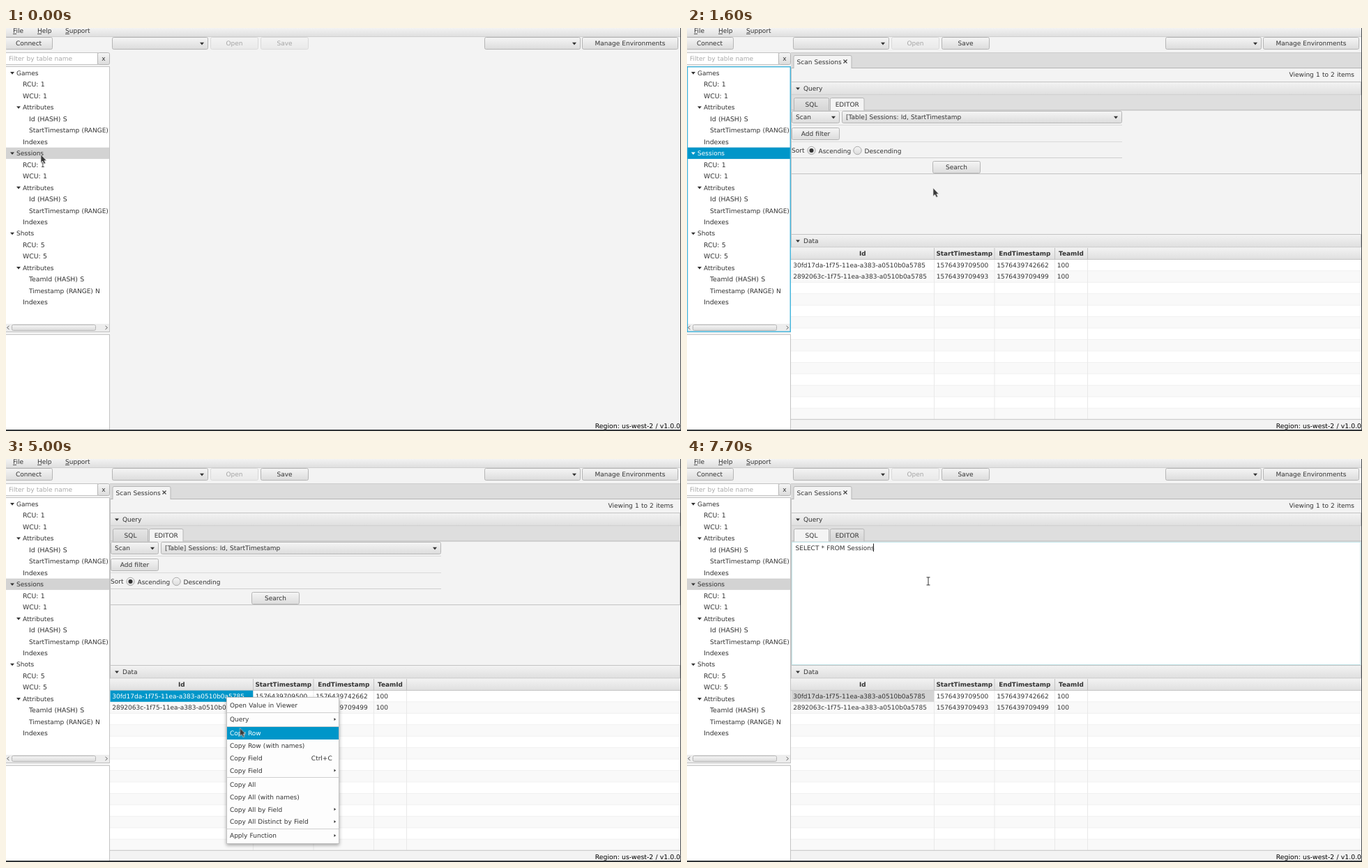
An HTML page for the animation above (8000 ms loop, 968x579 px).

```html
<!DOCTYPE html>
<html lang="en">
<head>
<meta charset="utf-8">
<title>Table browser</title>
<style>
html, body { margin: 0; width: 100%; height: 100%; overflow: hidden; background: #f3f3f3; }
svg { display: block; width: 968px; height: 579px; }
text { font: 9px "DejaVu Sans", Verdana, sans-serif; fill: #333; word-spacing: .3px; white-space: pre; text-rendering: geometricPrecision; }
.bold { font-weight: bold; font-size: 8.9px; }
.white { fill: #fff; }
.hint { fill: #aaa; }
.wide { font-size: 9.3px; }
.status { font-size: 9.3px; fill: #000; }
.mid { text-anchor: middle; }
.end { text-anchor: end; }
.off { opacity: .4; }
.menu { filter: drop-shadow(0 2px 2.5px rgba(0, 0, 0, .35)); }
</style>
</head>
<body>
<svg id="stage" viewBox="0 0 968 579"></svg>
<script>
const LOOP = 8000;
const BLUE = '#0096c9', GREY = '#d3d3d3', LINE = '#c3c3c3', EDGE = '#b5b5b5', DARK = '#333';

// Drawing helpers; text is placed by its vertical centre.
const text = (x, y, s, cls = '') => `<text x="${x}" y="${y + 3.3}" class="${cls}">${s}</text>`;
const rect = (x, y, w, h, fill, stroke = 'none', r = 0) =>
  `<rect x="${x}" y="${y}" width="${w}" height="${h}" rx="${r}" fill="${fill}" stroke="${stroke}"/>`;
const path = (d, fill = 'none', stroke = 'none', width = 1) =>
  `<path d="${d}" fill="${fill}" stroke="${stroke}" stroke-width="${width}"/>`;
const hline = (x1, x2, y, color = LINE) => path(`M${x1} ${y}H${x2}`, 'none', color);
const vline = (x, y1, y2, color = LINE) => path(`M${x} ${y1}V${y2}`, 'none', color);
const down = (x, y, color = DARK, s = 3) => path(`M${x - s} ${y - s / 2}h${2 * s}l${-s} ${s * 1.2}z`, color);
const right = (x, y, color = DARK) => path(`M${x - 1.2} ${y - 2}l2.6 2l-2.6 2z`, color);
const group = (id, ...parts) => `<g id="${id}">${parts.join('')}</g>`;
const gradient = (id, top, bottom) =>
  `<linearGradient id="${id}" x2="0" y2="1"><stop stop-color="${top}"/><stop offset="1" stop-color="${bottom}"/></linearGradient>`;

const button = (x, y, w, label, cls = '') =>
  `<g class="${cls}">${rect(x + .5, y + .5, w - 1, 17, 'url(#face)', EDGE, 2)}${text(x + w / 2, y + 9, label, 'mid')}</g>`;
const combo = (x, y, w, label = '') =>
  rect(x + .5, y + .5, w - 1, 17, 'url(#face)', EDGE, 2) + text(x + 6, y + 9, label) + down(x + w - 9, y + 9.3);
const tab = (x, y, w, h, label, fill) =>
  path(`M${x} ${y + h}V${y + 2}q0 -2 2 -2h${w - 4}q2 0 2 2v${h - 2}`, fill, EDGE) + text(x + w / 2, y + h / 2, label, 'mid');
const titleBar = (y, label) =>
  rect(149.5, y, 817, 18.5, 'url(#bar)', LINE) + down(159, y + 9.5) + text(167, y + 9.5, label);
const radio = (x, y, label, on) =>
  `<circle cx="${x}" cy="${y}" r="5.7" fill="url(#face)" stroke="#a8a8a8"/>` +
  (on ? `<circle cx="${x}" cy="${y}" r="3" fill="${DARK}"/>` : '') + text(x + 10, y + .5, label);

const PITCH = 16.47;
const treeY = i => 64.6 + PITCH * i;

function tree() {
  const table = (name, units, hash, range) => [
    [0, name], [1, 'RCU: ' + units], [1, 'WCU: ' + units], [1, 'Attributes'],
    [2, hash + ' (HASH) S'], [2, range], [1, 'Indexes']
  ];
  const start = 'StartTimestamp (RANGE)';
  const rows = [
    ...table('Games', 1, 'Id', start),
    ...table('Sessions', 1, 'Id', start),
    ...table('Shots', 5, 'TeamId', 'Timestamp (RANGE) N')
  ];
  const y = treeY(7), bar = rect(0, y - 8.2, 148.5, 16.4, BLUE);
  return rect(-.5, 55.5, 149, 381, '#fff', LINE) +
    rect(0, y - 8.2, 148, 16.4, GREY) +
    rows.map(([depth, label], i) =>
      text([15, 24, 33][depth], treeY(i), label, /U:|HASH|Ind/.test(label) ? 'wide' : '') +
      (depth === 0 || label === 'Attributes' ? down(9 + depth * 9, treeY(i)) : '')).join('') +
    rect(0, 425, 148, 11, '#ededed') + rect(8.5, 426.5, 120, 8, 'url(#face)', EDGE, 2) +
    path('M4.5 428l-3 2.5l3 2.5M142.500 428l3 2.500l-3 2.500', 'none', '#666') +
    group('treeFocus', bar, down(9, y, '#fff'), text(15, y, 'Sessions', 'white'),
      `<rect x=".5" y="55.7" width="147.800" height="380.600" fill="none" stroke="#45b5dc" stroke-width="1.500"/>`) +
    group('loading', bar, down(9, y, '#fff'), text(29, y, 'Sessions', 'white')) +
    rect(-.5, 440.5, 149, 137, '#fff', LINE);
}

function frame() {
  return rect(0, 0, 968, 12, 'url(#bar)') + hline(0, 968, 12.5, '#cfcfcf') +
    text(10, 4, 'File') + text(45, 4, 'Help') + text(85, 4, 'Support') +
    path('M10 8.500h5M45 8.500h6M85 8.500h6', 'none', DARK, .8) +
    button(-2, 13, 69, 'Connect') + combo(152, 13, 138) +
    button(293, 13, 69, 'Open', 'off') + button(365, 13, 69, 'Save', 'off') +
    group('saveOn', rect(364, 12.9, 71, 19, '#f3f3f3'), button(365, 13, 69, 'Save')) +
    combo(686, 13, 138) + button(826, 13, 138, 'Manage Environments') +
    rect(-.5, 35.5, 132, 17, '#fff', LINE) + text(4, 43.6, 'Filter by table name', 'hint') +
    button(131, 35, 18, 'x');
}

function queryTabs(sqlActive) {
  const fill = on => on ? '#f4f4f4' : 'url(#tabIdle)';
  return rect(150, 97, 816.5, 21, '#dedede') + hline(150, 967, 118, EDGE) +
    tab(153.5, 100.5, 50, 18, 'SQL', fill(sqlActive)) + tab(205.5, 100.5, 48.5, 18, 'EDITOR', fill(!sqlActive));
}

function editor() {
  return queryTabs(false) +
    group('sqlHover', tab(153.5, 100.5, 50, 18, 'SQL', '#ececec')) +
    vline(966.5, 118, 209, LINE) + hline(150, 967, 209.5) +
    combo(150, 119, 69, 'Scan') + combo(222, 119, 402, '[Table] Sessions: Id, StartTimestamp') +
    hline(150, 624, 139.5, '#dadada') + button(150, 143, 69, 'Add filter') +
    hline(150, 624, 163.5, '#dadada') + text(150, 175.5, 'Sort') +
    radio(178.5, 176, 'Ascending', true) + radio(244.5, 176, 'Descending') +
    hline(150, 624, 186.5, '#cfcfcf') + button(352, 191, 69, 'Search');
}

function sqlPane() {
  return queryTabs(true) + rect(150.5, 119.5, 815.5, 176, '#fff', '#d6d6d6') +
    text(155.5, 127.3, 'SELECT * FROM Sessions') +
    group('sqlFocus', rect(150.5, 119.5, 815.5, 176, 'none', '#c3e6ea'), vline(267.5, 121.5, 133, '#222'));
}

function dataTable() {
  const edges = [149, 354.5, 441, 527.5, 574.5];
  const heads = ['Id', 'StartTimestamp', 'EndTimestamp', 'TeamId'];
  const cells = [
    ['30fd17da-1f75-11ea-a383-a0510b0a5785', '1576439709500', '1576439742662', '100'],
    ['2892063c-1f75-11ea-a383-a0510b0a5785', '1576439709493', '1576439709499', '100']
  ];
  const top = 332.4, rowH = 16.45, first = cells[0][0];
  let out = titleBar(296.5, 'Data') + rect(149, 315.5, 818, 17, 'url(#bar)') + rect(149, top, 818, 229.6, '#fff');
  for (let i = 1; i < 14; i += 2)
    out += rect(149, top + i * rowH, 818, Math.min(rowH, 562 - top - i * rowH), '#f9f9f9');
  for (let i = 1; i < 14; i++) out += hline(149, 967, top + i * rowH, '#f1f1f1');
  for (const x of edges.slice(1)) out += vline(x, top, 562, '#e9e9e9') + vline(x, 316, top, LINE);
  out += hline(149, 967, top, LINE) + hline(149, 967, 562.3, LINE);
  heads.forEach((h, c) => out += text((edges[c] + edges[c + 1]) / 2, 324, h, 'bold mid'));
  cells.forEach((row, r) => row.forEach((s, c) => out += text(edges[c] + 3.2, 340.7 + r * rowH, s)));
  const chosen = (id, fill, cls) => group(id, rect(149.5, top + .2, 204.7, 16.2, fill), text(152.2, 340.7, first, cls));
  return out + chosen('cellFocus', BLUE, 'white') + chosen('cellIdle', GREY);
}

function page() {
  return group('page',
    rect(149, 35, 818, 22, '#dcdcdc'), hline(149, 967, 35.5, '#cdcdcd'), hline(149, 967, 57.5, EDGE),
    tab(153, 39.5, 83, 18.5, '', '#f4f4f4'), text(157.5, 48.3, 'Scan Sessions'),
    path('M224.500 45.500l5 5m0 -5l-5 5', 'none', '#444', 1.2),
    text(957, 67, 'Viewing 1 to 2 items', 'end'),
    titleBar(77.5, 'Query'), vline(149.5, 57, 562),
    editor(), group('sqlPane', rect(150, 97, 816.8, 199, '#f3f3f3'), sqlPane()), dataTable());
}

// A popup: items are [centre y, label, tail]; '>' as tail marks a submenu.
function menu(id, x, y, w, h, items, rules = [], hovers = {}) {
  const entry = ([cy, label, tail], cls = '') => text(x + 5, cy, label, cls) +
    (tail === '>' ? right(x + w - 6.3, cy, cls ? '#fff' : DARK) : tail ? text(x + w - 10.3, cy, tail, 'end') : '');
  return group(id,
    `<g class="menu">${rect(x + .5, y + .5, w - 1, h - 1, '#fdfdfd', LINE)}</g>`,
    ...rules.map(ry => hline(x + 1, x + w - 1, ry, '#cfcfcf')),
    ...items.map(item => entry(item)),
    ...Object.entries(hovers).map(([name, i]) =>
      group(name, rect(x + 1, items[i][0] - 9, w - 2, 18, BLUE), entry(items[i], 'white'))));
}

function menus() {
  return menu('tableMenu', 49, 183, 95, 76,
      ['Scan', 'Query', 'Describe', 'Delete table'].map((s, i) => [194 + i * 18, s]), [], { hoverScan: 0 }) +
    menu('cellMenu', 316, 342, 162, 211, [
      [354, 'Open Value in Viewer'], [374, 'Query', '>'], [394, 'Copy Row'], [412, 'Copy Row (with names)'],
      [429.8, 'Copy Field', 'Ctrl+C'], [447.6, 'Copy Field', '>'], [467.6, 'Copy All'],
      [485.4, 'Copy All (with names)'], [503.2, 'Copy All by Field', '>'],
      [521, 'Copy All Distinct by Field', '>'], [541, 'Apply Function', '>']
    ], [364.5, 384.5, 457.5, 531.5], { hoverOpen: 0, hoverQuery: 1, hoverCopy: 2 }) +
    menu('queryMenu', 478, 367, 70, 59, ['Games', 'Sessions', 'Shots'].map((s, i) => [378.5 + i * 18, s]));
}

const pointer = group('pointer',
  group('arrow', path('M0 0V11.500L2.600 9.300L4.600 13.200L6.600 12.200L4.800 8.500H8Z', '#383838', '#d8d8d8', .7)),
  group('beam', path('M-2.500 -5.500h5M0 -5.500v11M-2.500 5.500h5', 'none', '#333', 1)));

document.getElementById('stage').innerHTML =
  `<defs>${gradient('face', '#f5f5f5', '#dcdcdc')}${gradient('bar', '#f3f3f3', '#dfdfdf')}${gradient('tabIdle', '#e6e6e6', '#d5d5d5')}</defs>` +
  rect(0, 0, 968, 579, '#f3f3f3') + frame() + tree() + page() +
  text(967, 572, 'Region: us-west-2 / v1.0.0', 'status end') +
  rect(967, 0, 1, 579, '#4a4d50') + rect(0, 577, 968, 2, '#303437') + menus() + pointer;

// Motion: every change is a hard step at a time in ms.
let css = '';
function steps(id, prop, list) {
  const frames = list.map(([ms, value]) => `${ms / LOOP * 100}%{${prop}:${value}}`).join('');
  css += `@keyframes ${id}{${frames}}#${id}{animation:${id} ${LOOP}ms step-end infinite}`;
}
function during(id, from, to = LOOP) {
  const list = from ? [[0, 0], [from, 1]] : [[0, 1]];
  if (to < LOOP) list.push([to, 0]);
  steps(id, 'opacity', list);
}
during('treeFocus', 300, 3600);
during('tableMenu', 700, 1200);
during('hoverScan', 900, 1200);
during('loading', 1200, 1500);
during('saveOn', 1500);
during('page', 1500);
during('cellFocus', 3600, 7100);
during('cellIdle', 7100);
during('cellMenu', 3900, 6200);
during('hoverOpen', 4700, 4800);
during('hoverQuery', 4800, 5000);
during('queryMenu', 4800, 5000);
during('hoverCopy', 5000, 6200);
during('sqlHover', 6900, 7100);
during('sqlPane', 7100);
during('sqlFocus', 7700);
during('arrow', 0, 7400);
during('beam', 7400);
steps('pointer', 'transform', [
  [0, 50, 182], [900, 53, 185], [1000, 60, 188], [1100, 68, 190], [1200, 72, 191],
  [1400, 226, 212], [1500, 310, 225], [1600, 353, 230], [2000, 355, 231], [2100, 357, 232],
  [2400, 370, 276], [2500, 376, 311], [2800, 345, 330], [2900, 316, 342],
  [4600, 317, 346], [4700, 320, 353], [4800, 326, 367], [4900, 332, 378], [5000, 335.5, 386.5],
  [6400, 331, 378], [6500, 312, 340], [6600, 276, 272], [6700, 234, 196], [6800, 200, 138],
  [6900, 183, 110], [7000, 178, 102], [7300, 190, 110], [7400, 235, 132], [7500, 295, 158],
  [7600, 335, 172], [7700, 346, 175.5]
].map(([ms, x, y]) => [ms, `translate(${x}px,${y}px)`]));
document.head.appendChild(document.createElement('style')).textContent = css;
</script>
</body>
</html>
```
